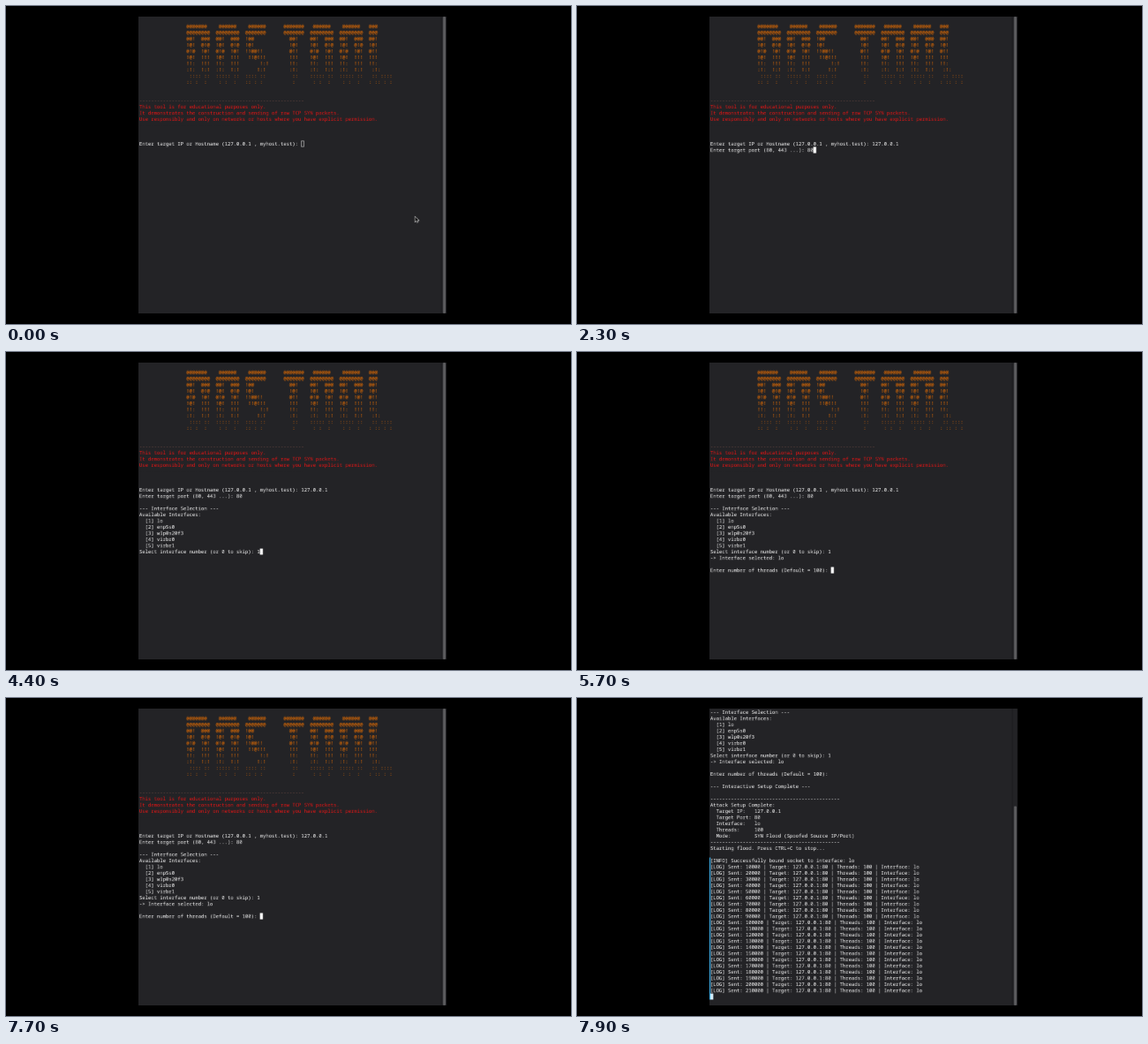
Recreate the animation shown at these times as an HTML page with a canvas. Size 640 px wide and 360 px high, loop 8000 ms.

```html
<!DOCTYPE html>
<html lang="en">
<head>
<meta charset="utf-8">
<title>Terminal session</title>
<style>
  html, body { margin: 0; width: 100%; height: 100%; overflow: hidden; background: #000; }
  canvas { display: block; width: 640px; height: 360px; }
</style>
</head>
<body>
<canvas id="stage" width="640" height="360"></canvas>
<script>
const LOOP = 8000;
const SCALE = 3; // the terminal is drawn large, then smoothly reduced
const CELL = 10 / 3, ROW = 7, LEFT = 151, TOP = 12.5, ROWS = 47;
const TERMINAL = { x: 150, y: 12, w: 349, h: 336 };
const COLOR = { back: '#232326', text: '#fcfcfc', orange: '#f67400', red: '#ed1515',
  faint: '#6a4a44', thumb: '#5c5c5e', edge: '#19191b', blue: '#3daee9' };

const LETTERS = {
  D: ['@@@@@@@', '@@@@@@@@', '@@!  @@@', '!@!  @!@', '@!@  !@!', '!@!  !!!', '!!:  !!!', ':!:  !:!', ' :::: ::', ':: :  :'],
  O: [' @@@@@@', '@@@@@@@@', '@@!  @@@', '!@!  @!@', '@!@  !@!', '!@!  !!!', '!!:  !!!', ':!:  !:!', '::::: ::', ' : :  :'],
  S: [' @@@@@@', '@@@@@@@', '!@@', '!@!', '!!@@!!', ' !!@!!!', '     !:!', '    !:!', ':::: ::', ':: : :'],
  T: ['@@@@@@@', '@@@@@@@', '  @@!', '  !@!', '  @!!', '  !!!', '  !!:', '  :!:', '   ::', '   :'],
  L: ['@@@', '@@@', '@@!', '!@!', '@!!', '!!!', '!!:', ' :!:', ' :: ::::', ': :: : :']
};
const LETTER_COLUMNS = [['D', 16], ['O', 26], ['S', 36], ['T', 49], ['O', 58], ['O', 68], ['L', 78]];
const banner = LETTERS.D.map((_, row) =>
  LETTER_COLUMNS.reduce((line, [letter, column]) => line.padEnd(column) + LETTERS[letter][row], ''));

const logs = Array.from({ length: 21 }, (_, i) =>
  `[LOG] Sent: ${(i + 1) * 10000} | Target: 127.0.0.1:80 | Threads: 100 | Interface: lo`);

const lines = [
  '', ...banner, '', '',
  '-'.repeat(56),
  'This tool is for educational purposes only.',
  'It demonstrates the construction and sending of raw TCP SYN packets.',
  'Use responsibly and only on networks or hosts where you have explicit permission.',
  '-'.repeat(56),
  '', '',
  'Enter target IP or Hostname (127.0.0.1 , myhost.test): 127.0.0.1',
  'Enter target port (80, 443 ...): 80',
  '',
  '--- Interface Selection ---',
  'Available Interfaces:',
  ...['lo', 'enp5s0', 'wlp0s20f3', 'virbr0', 'virbr1'].map((name, i) => `  [${i + 1}] ${name}`),
  'Select interface number (or 0 to skip): 1',
  '-> Interface selected: lo',
  '',
  'Enter number of threads (Default = 100): ',
  '',
  '--- Interactive Setup Complete ---',
  '',
  '-'.repeat(44),
  'Attack Setup Complete:',
  '  Target IP:   127.0.0.1',
  '  Target Port: 80',
  '  Interface:   lo',
  '  Threads:     100',
  '  Mode:        SYN Flood (Spoofed Source IP/Port)',
  '-'.repeat(44),
  'Starting flood. Press CTRL+C to stop...',
  '',
  '[INFO] Successfully bound socket to interface: lo',
  ...logs,
  ''
];
const FIRST_OUTPUT = lines.findIndex(line => line.startsWith('[INFO]'));

// start time, number of lines shown, characters still missing from the last one
const STEPS = [
  [0, 21, 9], [1100, 21, 3], [1200, 21, 0], [1300, 22, 2], [2100, 22, 1], [2200, 22, 0],
  [3900, 31, 1], [4400, 31, 0], [4900, 34, 0], [7800, 54, 99], [7900, 70, 0]
];
// start time, x, y
const POINTER = [[0, 463.5, 238.7], [100, 455, 236], [200, 430, 228], [300, 413, 221.5], [500, -20, -20]];

const buffer = document.createElement('canvas');
buffer.width = 640 * SCALE;
buffer.height = 360 * SCALE;
const pen = buffer.getContext('2d');
const stage = document.getElementById('stage').getContext('2d');
stage.imageSmoothingQuality = 'high';

const latest = (list, time) => list.filter(([start]) => start <= time).pop();

function box(color, x, y, w, h) {
  pen.fillStyle = color;
  pen.fillRect(x, y, w, h);
}

function lineColor(index, scrolled) {
  if (index <= 10) return COLOR.orange;
  if (index === 13 && !scrolled) return COLOR.faint;
  if (index === 17 && !scrolled) return COLOR.back;
  return index <= 17 ? COLOR.red : COLOR.text;
}

function drawLine(text, row, color) {
  pen.fillStyle = color;
  [...text].forEach((char, column) => {
    if (char !== ' ') pen.fillText(char, LEFT + column * CELL, TOP + row * ROW + 5.4);
  });
}

function drawCursor(column, row, focused, running) {
  const x = LEFT + column * CELL, y = TOP + row * ROW;
  if (focused) return box(running ? '#d8effb' : COLOR.text, x, y, CELL, ROW);
  pen.strokeStyle = COLOR.text;
  pen.lineWidth = 0.5;
  pen.strokeRect(x + 0.25, y + 0.25, CELL - 0.5, ROW - 0.5);
}

function drawScrollbar(first, total) {
  const y = TERMINAL.y + TERMINAL.h * first / total;
  box(COLOR.edge, 492.7, TERMINAL.y, 0.8, TERMINAL.h);
  pen.fillStyle = COLOR.thumb;
  pen.beginPath();
  pen.roundRect(495, y, 3, TERMINAL.y + TERMINAL.h - y, 1.3);
  pen.fill();
}

function drawPointer(x, y) {
  const arrow = new Path2D('M0 0V5.4L1.3 4.3L2.2 6.2L3.1 5.8L2.2 3.9H4Z');
  pen.save();
  pen.translate(x, y);
  pen.strokeStyle = '#fff';
  pen.lineWidth = 0.9;
  pen.stroke(arrow);
  pen.fillStyle = '#111';
  pen.fill(arrow);
  pen.restore();
}

function draw(time) {
  const [, shown, missing] = latest(STEPS, time);
  const [, pointerX, pointerY] = latest(POINTER, time);
  const first = Math.max(0, shown - ROWS);
  const running = shown > FIRST_OUTPUT;
  const last = lines[shown - 1];
  const typed = last.slice(0, Math.max(0, last.length - missing));

  pen.setTransform(SCALE, 0, 0, SCALE, 0, 0);
  pen.font = `${CELL / 0.6}px "Noto Sans Mono", monospace`;
  box('#000', 0, 0, 640, 360);
  box(COLOR.back, TERMINAL.x, TERMINAL.y, TERMINAL.w, TERMINAL.h);
  for (let i = first; i < shown; i++) {
    drawLine(i === shown - 1 ? typed : lines[i], i - first, lineColor(i, first > 0));
  }
  drawCursor(typed.length, shown - 1 - first, time >= 300, running);
  if (running) {
    box(COLOR.blue, 150, TOP + (FIRST_OUTPUT - first) * ROW, 1.3, (shown - FIRST_OUTPUT) * ROW);
  }
  drawScrollbar(first, Math.max(shown, ROWS));
  drawPointer(pointerX, pointerY);
  stage.drawImage(buffer, 0, 0, 640, 360);
}

let drawnTick = -1;
const begin = performance.now();
function play() {
  const tick = Math.floor((performance.now() - begin) % LOOP / 100);
  if (tick !== drawnTick) draw(tick * 100);
  drawnTick = tick;
  requestAnimationFrame(play);
}
play();
</script>
</body>
</html>
```
